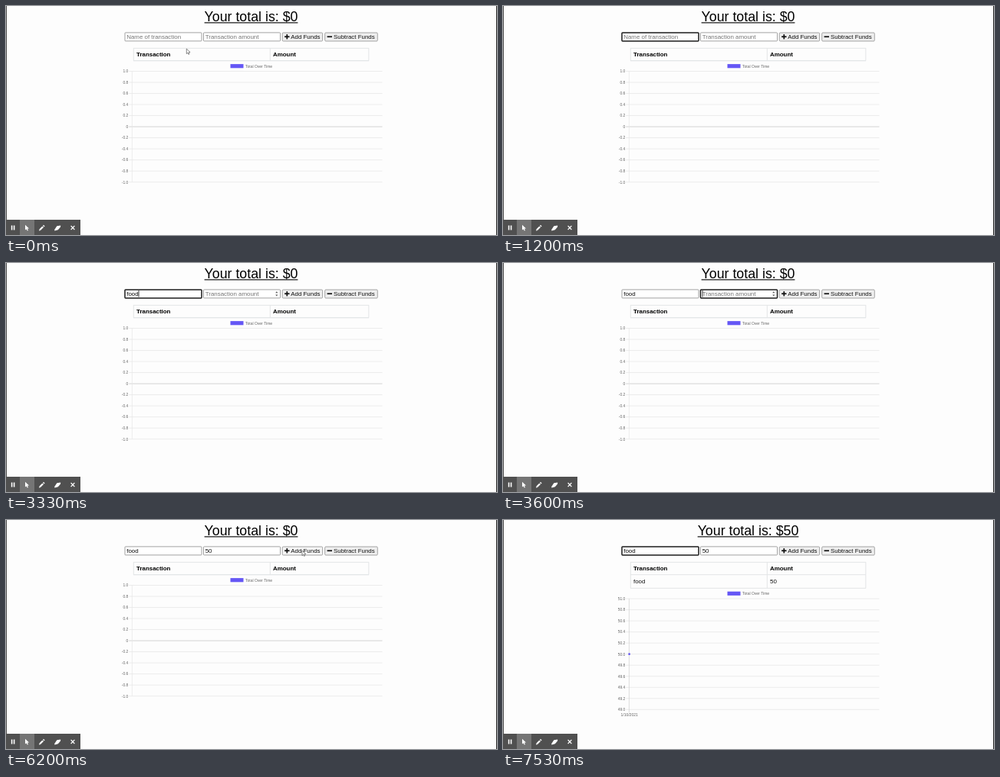
Write an HTML page with a canvas that moves like this. It is 640 by 300 pixels and loops after 8000 ms.

```html
<!DOCTYPE html>
<html lang="en">
<head>
<meta charset="utf-8">
<title>Budget tracker</title>
<style>
html, body { margin: 0; width: 100%; height: 100%; overflow: hidden; background: #fdfdfd; }
canvas { display: block; width: 640px; height: 300px; }
</style>
</head>
<body>
<canvas id="stage"></canvas>
<script>
const LOOP = 8000;
const SANS = '"Liberation Sans", Arial, sans-serif';
const ACCENT = '#6557f5';
const canvas = document.getElementById('stage');
const ctx = canvas.getContext('2d');
const ratio = window.devicePixelRatio || 1;
canvas.width = 640 * ratio;
canvas.height = 300 * ratio;

// Click and key times in ms
const T = { name: 660, amount: 3400, press: 6130, add: 6230, again: 6730, againCaret: 7000 };
const NAME_KEYS = [1800, 1860, 2060, 2260];
const AMOUNT_KEYS = [4860, 5060];
const BLINK = 530;

const between = (t, a, b) => t >= a && t < b;
const typed = (word, keys, t) => word.slice(0, keys.filter(k => t >= k).length);

function caretOn(t, resets) {
  const last = Math.max(...resets.filter(r => t >= r));
  return Math.floor((t - last) / BLINK) % 2 === 0;
}

function rect(x, y, w, h, color) {
  ctx.fillStyle = color;
  ctx.fillRect(x, y, w, h);
}

function line(x1, y1, x2, y2, color, width = 1) {
  ctx.strokeStyle = color;
  ctx.lineWidth = width;
  ctx.beginPath();
  ctx.moveTo(x1, y1);
  ctx.lineTo(x2, y2);
  ctx.stroke();
}

function box(x, y, w, h, r, fill, stroke, width) {
  ctx.beginPath();
  ctx.roundRect(x, y, w, h, r);
  ctx.fillStyle = fill;
  ctx.fill();
  ctx.strokeStyle = stroke;
  ctx.lineWidth = width;
  ctx.stroke();
}

function shape(points, fill, stroke, width = 0.7) {
  ctx.beginPath();
  points.forEach(([x, y]) => ctx.lineTo(x, y));
  ctx.closePath();
  ctx.fillStyle = fill;
  ctx.fill();
  if (stroke) {
    ctx.strokeStyle = stroke;
    ctx.lineWidth = width;
    ctx.stroke();
  }
}

function text(str, x, y, size = 7.93, color = '#111', align = 'left', weight = '') {
  ctx.font = `${weight} ${size}px ${SANS}`;
  ctx.textAlign = align;
  ctx.fillStyle = color;
  ctx.fillText(str, x, y);
  return ctx.measureText(str).width;
}

function heading(total) {
  const w = text('Your total is: $' + total, 319.5, 20, 17.78, '#000', 'center');
  rect(319.5 - w / 2, 21.3, w, 1.2, '#111');
}

function field(x, value, hint, focus, caret) {
  const style = [['#8c8c8c', 0.8], ['#444', 1], ['#1c1c1c', 1.5]][focus];
  box(x, 34.9, 100, 11, 0.8, '#fff', ...style);
  const w = text(value || hint, x + 2.2, 43, 7.93, value ? '#111' : '#757575');
  if (caret) rect(x + 2.2 + (value ? w : 0), 36, 0.8, 8.6, '#111');
}

function spinner() {
  shape([[351.2, 39.2], [352.8, 37.2], [354.4, 39.2]], '#555');
  shape([[351.2, 41.6], [352.8, 43.6], [354.4, 41.6]], '#555');
}

function button(x, w, label, labelX, plus, fill) {
  box(x, 35, w, 11, 1.2, fill, '#8f8f8f', 0.8);
  const iconX = x + 2.9;
  rect(iconX, 39.4, 6.4, 1.7, '#111');
  if (plus) rect(iconX + 2.35, 37.1, 1.7, 6.3, '#111');
  text(label, labelX, 43);
}

function table(filled) {
  const bottom = filled ? 89.3 : 71.7;
  const c = '#e3e5e7';
  line(166, 55.3, 473, 55.3, c);
  line(166, 71.7, 473, 71.7, c);
  line(166, bottom, 473, bottom, c);
  [166.3, 344.3, 472.8].forEach(x => line(x, 55, x, bottom, c));
  text('Transaction', 170, 65.9, 7.93, '#000', 'left', 'bold');
  text('Amount', 348, 65.9, 7.93, '#000', 'left', 'bold');
  if (filled) {
    text('food', 170, 83.4);
    text('50', 348, 83.4);
  }
}

function chart(t, filled) {
  const top = filled ? 103.1 : 85.5;
  const step = 14.52;
  const bottom = top + step * 10;
  rect(292.5, top - 9.4, 17, 5.2, ACCENT);
  text('Total Over Time', 312, top - 5, 5, '#666');
  for (let i = 0; i <= 10; i++) {
    const y = top + i * step;
    const v = (filled ? 50 : 0) + (5 - i) / 5;
    const zero = !filled && i === 5;
    line(160.2, y, 490.5, y, zero ? '#c9c9c9' : '#e8e8e8', 0.8);
    text(zero ? '0' : v.toFixed(1), 159.4, y + 1.8, 5, '#666', 'right');
  }
  line(164.4, top, 164.4, bottom + (filled ? 4 : 0), filled ? '#d2d2d2' : '#e8e8e8', 0.7);
  if (!filled) return;
  text('1/10/2021', 164.6, bottom + 8.6, 5, '#666', 'center');
  // The new point rises from the axis with an ease-out quart
  const p = Math.min((t - T.add) / 1000, 1);
  const y = top + step * 5 + step * 5 * (1 - p) ** 4;
  ctx.beginPath();
  ctx.arc(164.6, y, 1.35, 0, 7);
  ctx.fillStyle = ACCENT;
  ctx.fill();
}

function toolbar() {
  rect(0, 280, 97, 20, '#505050');
  rect(18, 280, 19, 20, '#757575');
  rect(6.8, 287.5, 1.6, 6, '#fff');
  rect(9.8, 287.5, 1.6, 6, '#fff');
  shape([[25, 286.8], [25, 293.6], [26.6, 292.2], [27.8, 294.6], [29, 294], [27.8, 291.8], [30, 291.6]], '#fff');
  line(44.4, 293, 48.2, 289.2, '#fff', 2.2);
  line(48.8, 288.6, 49.8, 287.6, '#fff', 2.2);
  shape([[43, 294.4], [43.5, 292.2], [45.2, 293.9]], '#fff');
  shape([[63.2, 293], [66.4, 288.2], [71.2, 287.4], [71, 289.4], [67.8, 293.2], [63.4, 294.4]], '#fff');
  line(84.6, 288, 89.4, 293, '#fff', 1.1);
  line(89.4, 288, 84.6, 293, '#fff', 1.1);
}

function arrow(x, y) {
  shape([[0, 0], [0, 6.6], [1.6, 5.2], [2.6, 7.4], [3.7, 6.9], [2.7, 4.8], [4.8, 4.6]]
    .map(([a, b]) => [x + a, y + b]), '#fff', '#555');
}

// Pointer stops: time, x, y
const TRACKS = [
  [[0, 235.3, 56], [60, 235.3, 56], [400, 220, 41]],
  [[5800, 340, 41], [6060, 386, 40], [6270, 386, 40], [6560, 300, 40]]
];

function pointer(t) {
  for (const track of TRACKS) {
    for (let i = 1; i < track.length; i++) {
      const [t0, x0, y0] = track[i - 1];
      const [t1, x1, y1] = track[i];
      if (!between(t, t0, t1)) continue;
      const k = (t - t0) / (t1 - t0);
      const x = x0 + (x1 - x0) * k;
      const y = y0 + (y1 - y0) * k;
      // Over a text field the pointer does not show
      if (y > 46.5 || x > 358) arrow(x, y);
    }
  }
}

function draw(t) {
  ctx.setTransform(ratio, 0, 0, ratio, 0, 0);
  rect(0, 0, 640, 300, '#fdfdfd');
  rect(0, 0, 0.8, 300, '#222');
  rect(639, 0, 1, 300, '#222');

  const filled = t >= T.add;
  heading(filled ? 50 : 0);

  const nameOn = between(t, T.name, T.amount);
  const amountOn = between(t, T.amount, T.press);
  const nameFocus = nameOn || t >= 6800 ? 2 : t >= T.again ? 1 : 0;
  const nameCaret = nameOn && caretOn(t, [T.name, ...NAME_KEYS])
    || between(t, T.againCaret, T.againCaret + BLINK);
  const amountCaret = amountOn && caretOn(t, [T.amount, ...AMOUNT_KEYS]);
  field(155, typed('food', NAME_KEYS, t), 'Name of transaction', nameFocus, nameCaret);
  field(257.5, typed('50', AMOUNT_KEYS, t), 'Transaction amount', amountOn ? 2 : 0, amountCaret);
  if (between(t, 3070, T.press)) spinner();

  const pressed = between(t, T.press, T.add);
  const hover = between(t, 5930, 6340);
  button(360.2, 52.4, 'Add Funds', 371.2, true, pressed ? '#f5f5f5' : hover ? '#e5e5e5' : '#efefef');
  button(415.7, 68.6, 'Subtract Funds', 427, false, '#efefef');

  table(filled);
  chart(t, filled);
  toolbar();
  pointer(t);
}

const start = performance.now();
function tick() {
  draw((performance.now() - start) % LOOP);
  requestAnimationFrame(tick);
}
tick();
</script>
</body>
</html>
```
